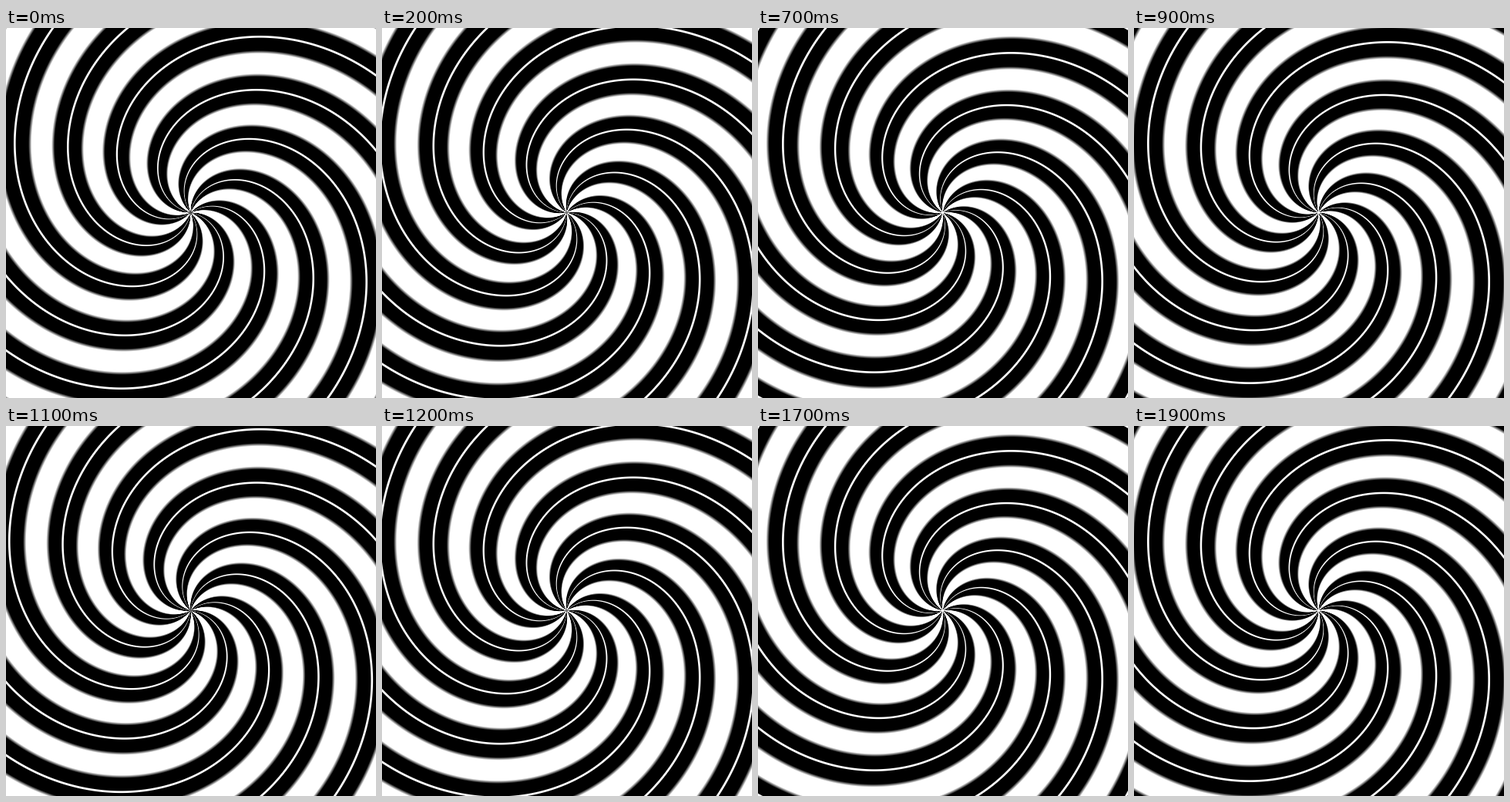
Recreate the animation shown at these times as an HTML page with a canvas. Size 480 by 480 pixels, loop 2 s.

```html
<!DOCTYPE html>
<html lang="en">
<head>
<meta charset="utf-8">
<title>Spiral</title>
<style>
  html, body { margin: 0; width: 100%; height: 100%; overflow: hidden; background: #000; }
  canvas { display: block; width: 480px; height: 480px; }
</style>
</head>
<body>
<canvas id="stage" width="480" height="480"></canvas>
<script>
const SIZE = 480, CENTER = 239;
const ARMS = 8, TWIST = 1 / 96.6;      // radians of twist per pixel of radius
const STEP_MS = 100, STEPS = 10;       // one arm spacing per second
const START = 0.755;                   // arm offset at time zero
const LINE = 0.019;                    // half width of a thin line, in arm spacings

const ctx = document.getElementById("stage").getContext("2d");
const image = ctx.createImageData(SIZE, SIZE);
const pixels = new Uint32Array(image.data.buffer);

// Arm phase of every pixel (whole numbers lie on the thin lines)
// and how much the phase changes across that pixel.
const phase = new Float32Array(SIZE * SIZE);
const slope = new Float32Array(SIZE * SIZE);
for (let y = 0, i = 0; y < SIZE; y++) {
  for (let x = 0; x < SIZE; x++, i++) {
    const dx = x - CENTER, dy = CENTER - y;
    const radius = Math.hypot(dx, dy);
    const perRadian = ARMS / (2 * Math.PI);
    phase[i] = (Math.atan2(dy, dx) + radius * TWIST) * perRadian;
    slope[i] = Math.hypot(1 / Math.max(radius, 1), TWIST) * perRadian;
  }
}

const clamp = v => Math.min(1, Math.max(0, v));

// White line, black band, soft edge, white.
function brightness(distance, pixelWidth) {
  const line = clamp((LINE - distance) / pixelWidth + 0.5);
  const edge = clamp((distance - 0.253) / 0.06);
  return Math.max(line, edge);
}

function draw(step) {
  const offset = START + step / STEPS;
  for (let i = 0; i < pixels.length; i++) {
    const p = phase[i] - offset;
    const level = Math.round(255 * brightness(Math.abs(p - Math.round(p)), slope[i]));
    pixels[i] = 0xff000000 | level * 0x010101;
  }
  ctx.putImageData(image, 0, 0);
}

let shown = -1;
const start = performance.now();
function tick() {
  const step = Math.floor((performance.now() - start) / STEP_MS) % STEPS;
  if (step !== shown) draw(shown = step);
  requestAnimationFrame(tick);
}
tick();
</script>
</body>
</html>
```
